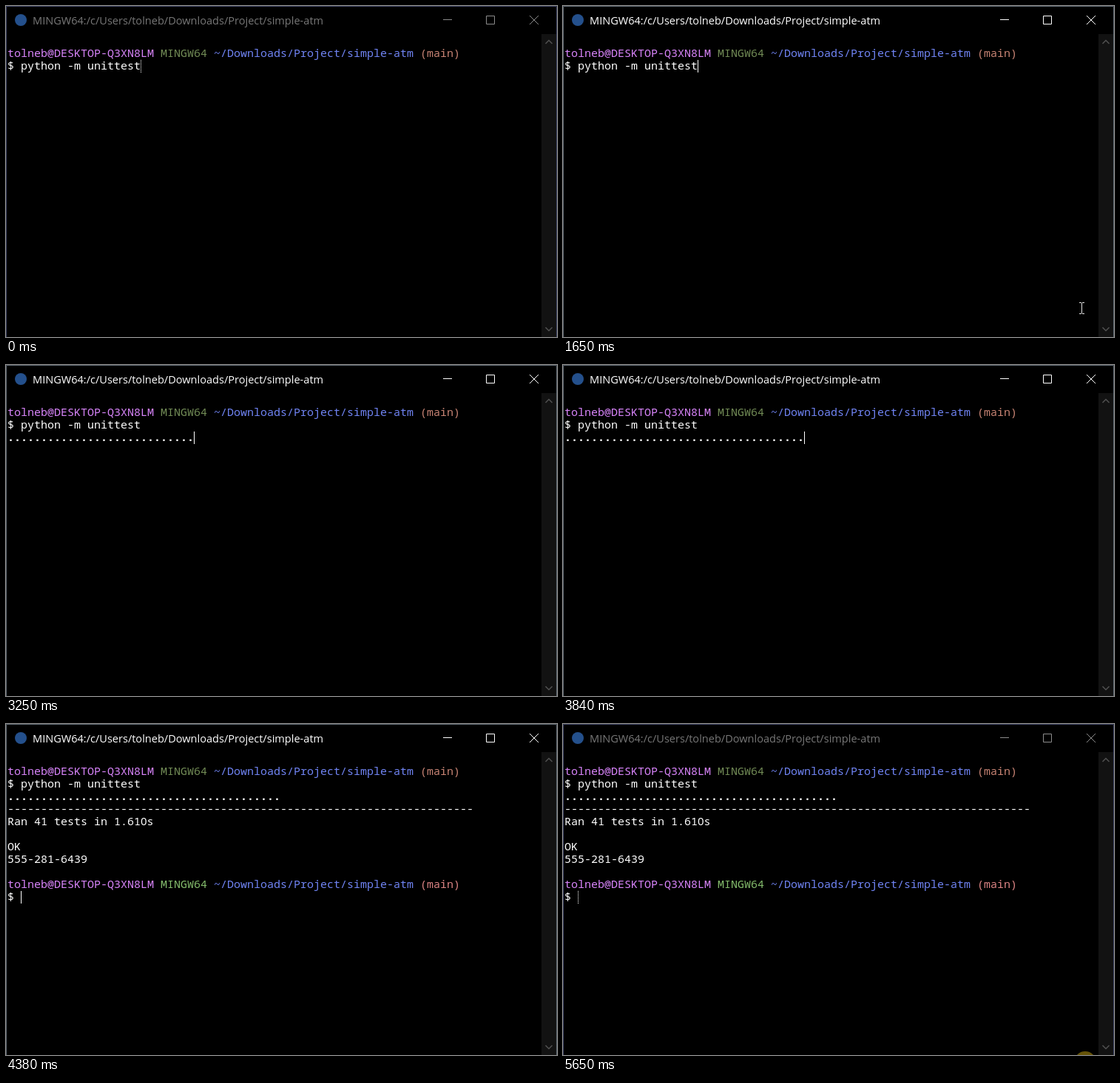
Animation of 745 by 448 pixels, one loop 5860 ms. Source, as an HTML page:

```html
<!DOCTYPE html>
<html lang="en">
<head>
<meta charset="utf-8">
<title>Terminal test run</title>
<style>
  html, body { margin: 0; width: 100%; height: 100%; overflow: hidden; background: #000; }
  svg { display: block; }
  .term { font: 500 15px "Noto Sans Mono", "DejaVu Sans Mono", monospace; fill: #fff; }
  .term .zero { font-family: "Noto Sans", "Open Sans", sans-serif; }
  .term .dots { font-weight: 700; }
  .user { fill: #d884fa; }
  .path { fill: #7084f4; }
  .sys { fill: #728c56; }
  .branch { fill: #c88474; }
  .fresh .sys { fill: #84bc6c; }
  .fresh .branch { fill: #dc8484; }
  .title { font: 14.55px "Open Sans", "Noto Sans", sans-serif; fill: #fff; }
  .controls { stroke: #fff; fill: none; }
  .edge { stroke: #5c6670; fill: none; }
  .idle .title { fill: #777; }
  .idle .controls { stroke: #8c8c8c; }
  .idle .edge { stroke: #3c4262; }
  .caret { stroke: #fff; }
  .idle .caret { stroke-dasharray: 1 1; }
  .arrows { stroke: #505050; stroke-width: 1.5; fill: none; }
  .beam { stroke: #e4e4e4; fill: none; }
  .halo { fill: #7f7b00; }
  .idle .halo { fill: #665409; }
</style>
</head>
<body>
<svg id="win" width="745" height="448" viewBox="0 0 745 448">
  <rect width="745" height="448"/>
  <rect x="724" y="38" width="20" height="410" fill="#121212"/>
  <path class="arrows" d="M729.5 51l4.5-4.5 4.5 4.5M729.5 435l4.5 4.5 4.5-4.5"/>
  <circle cx="20" cy="19" r="8" fill="#24508c"/>
  <text class="title" x="36" y="25">MINGW64:/c/Users/tolneb/Downloads/Project/simple-atm</text>
  <path class="controls" d="M591 18.5h12M649.5 13.5h11v11h-11zM708 13l12 12M720 13l-12 12"/>
  <g id="term" class="term"></g>
  <path id="caret" class="caret" d="M.5 0v17"/>
  <circle id="halo" class="halo" cx="-2" cy="-1" r="15"/>
  <path id="beam" class="beam" d="M-3-7.5h3M1-7.5h3M.5-7V7M-3 7.5h3M1 7.5h3"/>
  <path class="edge" d="M.5 448V.5h744V448"/>
</svg>
<script>
const LOOP = 5860, LEFT = 2, TOP = 56, CELL = 9, ROW = 17, BLINK = 530;
const FOCUS = 590, TYPE = 2110, ENTER = 2170, DONE = 4020, EXIT = 4110, PROMPT = 4380,
  RETURN = 5050, BLUR = 5650;

const $ = id => document.getElementById(id);
const win = $('win'), term = $('term'), caret = $('caret'), halo = $('halo'), beam = $('beam');

// Adds one terminal line; returns the element.
function line(row, html, cls = '') {
  const el = document.createElementNS('http://www.w3.org/2000/svg', 'text');
  el.setAttribute('x', LEFT);
  el.setAttribute('y', TOP + row * ROW + 13);
  el.setAttribute('class', cls);
  el.innerHTML = html;
  return term.appendChild(el);
}
const span = (cls, text) => `<tspan class="${cls}">${text}</tspan>`;
const prompt = [
  span('user', 'tolneb@DESKTOP-Q3XN8LM'),
  span('sys', 'MINGW64'),
  span('path', '~/Downloads/Project/simple-atm'),
  span('branch', '(main)')
].join(' ');

line(0, prompt);
line(1, '$ python -m unittest');
const dots = line(2, '', 'dots');
const summary = [
  line(3, '-'.repeat(70)),
  line(4, `Ran 41 tests in 1.61${span('zero', '0')}s`),
  line(6, 'OK')
];
const account = [line(7, '555-281-6439')];
const nextPrompt = [line(9, prompt, 'fresh'), line(10, '$')];

const within = (t, a, b) => t >= a && t < b;
const show = (el, on) => el.style.display = on ? '' : 'none';
const move = (el, x, y) => el.setAttribute('transform', `translate(${x} ${y})`);

// Progress 0..1 in equal jumps: the first at a, the last at b.
function jumps(t, a, b, n) {
  const done = Math.floor((t - a) / (b - a) * (n - 1)) + 1;
  return Math.min(Math.max(done, 0), n) / n;
}

// The tests pass in four bursts.
const passed = t => Math.round(
  7 * jumps(t, 2500, 2650, 3) + 20 * jumps(t, 2850, 3050, 3) +
  6 * jumps(t, 3250, 3710, 6) + 8 * jumps(t, 3840, DONE, 3));

function caretCell(t, count) {
  if (t < ENTER) return [20, 1];
  if (t < DONE) return [count, 2];
  if (t < PROMPT) return [0, t < EXIT ? 7 : 8];
  return [2, 10];
}

// The caret stays lit while output arrives.
function caretLit(t) {
  if (within(t, ENTER, PROMPT)) return true;
  const since = t - (t < ENTER ? FOCUS : PROMPT - 60);
  return Math.floor(since / BLINK) % 2 !== 1;
}

// The pointer slides in from below and later leaves the same way.
function pointer(t) {
  const away = 1 - jumps(t, 190, 320, 3), out = jumps(t, RETURN, 5305, 4);
  return [Math.round(701 + 18 * away + 7 * out), Math.round(409 + 53 * away + 50 * out)];
}

function draw(t) {
  const count = passed(t), [col, row] = caretCell(t, count);
  win.classList.toggle('idle', !within(t, FOCUS, BLUR));
  dots.textContent = '.'.repeat(count);
  summary.forEach(el => show(el, t >= DONE));
  account.forEach(el => show(el, t >= EXIT));
  nextPrompt.forEach(el => show(el, t >= PROMPT));

  move(caret, LEFT + CELL * col, TOP + ROW * row);
  show(caret, caretLit(t));

  move(beam, ...pointer(t));
  move(halo, ...pointer(t));
  show(beam, !within(t, TYPE, RETURN));
  show(halo, within(t, FOCUS, FOCUS + 200) || t >= BLUR);
}

const start = performance.now();
function tick() {
  draw((performance.now() - start) % LOOP);
  requestAnimationFrame(tick);
}
tick();
</script>
</body>
</html>
```
